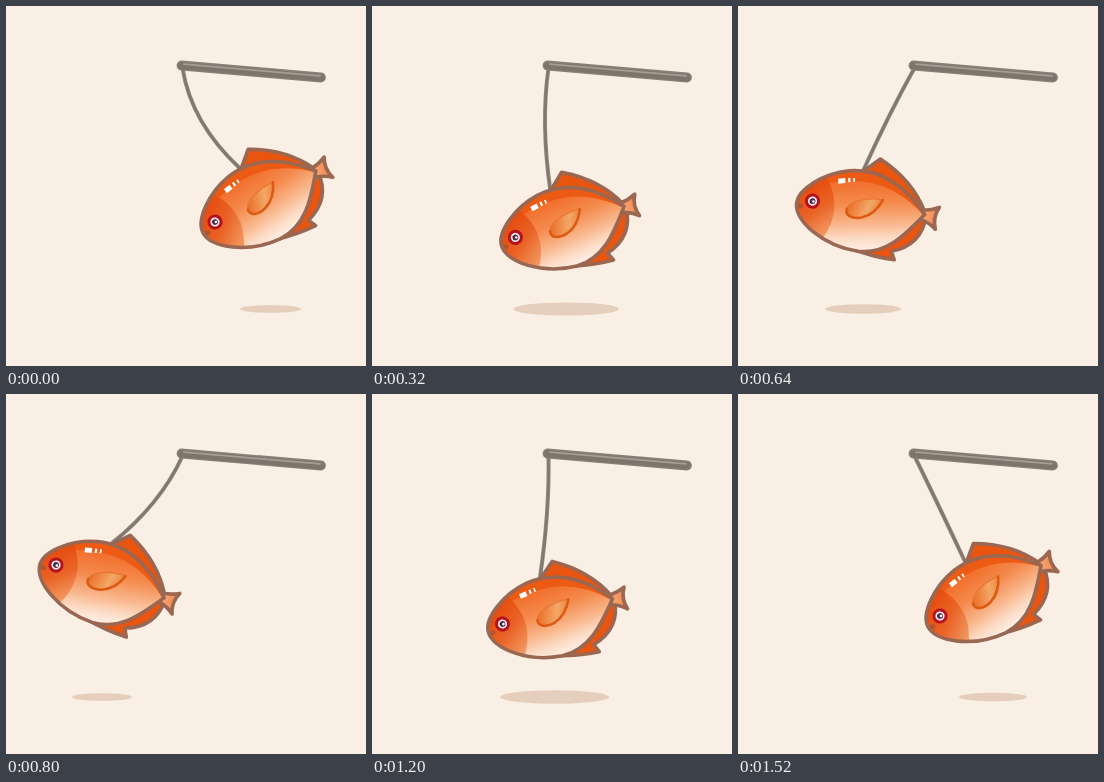
Write an HTML page that moves like this. It is 360 by 360 pixels and loops after 1560 ms.

```html
<!DOCTYPE html>
<html lang="en">
<head>
<meta charset="utf-8">
<title>Swinging fish</title>
<style>
  html, body { margin: 0; width: 100%; height: 100%; overflow: hidden; background: #f9efe4; }
  svg { display: block; width: 100vw; height: 100vh; }
</style>
</head>
<body>
<svg viewBox="0 0 360 360">
  <defs>
    <linearGradient id="belly" gradientUnits="userSpaceOnUse" x1="140" y1="184" x2="151" y2="253">
      <stop offset="0" stop-color="#f16c28"/>
      <stop offset=".35" stop-color="#f4894c"/>
      <stop offset=".65" stop-color="#f9b78c"/>
      <stop offset=".85" stop-color="#fcdac3"/>
      <stop offset="1" stop-color="#feece0"/>
    </linearGradient>
    <linearGradient id="head" gradientUnits="userSpaceOnUse" x1="84" y1="204" x2="115" y2="240">
      <stop offset="0" stop-color="#e64c0e"/>
      <stop offset=".5" stop-color="#ea6427"/>
      <stop offset="1" stop-color="#f19860"/>
    </linearGradient>
    <linearGradient id="fin" gradientUnits="userSpaceOnUse" x1="130" y1="208" x2="158" y2="216">
      <stop offset="0" stop-color="#ea6a22"/>
      <stop offset=".7" stop-color="#f2a868"/>
      <stop offset="1" stop-color="#ee8a45"/>
    </linearGradient>
    <linearGradient id="tail" gradientUnits="userSpaceOnUse" x1="203" y1="0" x2="220" y2="0">
      <stop offset="0" stop-color="#f9b080"/>
      <stop offset="1" stop-color="#f2844a"/>
    </linearGradient>
    <path id="body" d="M78.500 217C78.500 203 101 184 126 178C158 171 186 187 207 211C193 230 176 256 146 256.500C111 256 78.500 235 78.500 217Z"/>
    <clipPath id="inside"><use href="#body"/></clipPath>
  </defs>

  <ellipse id="shadow" cy="303" fill="#e6cebc"/>

  <g fill="none" stroke-linecap="round">
    <path class="string" stroke="#928880" stroke-width="4"/>
    <path class="string" stroke="#81776d" stroke-width="2.2"/>
    <path d="M175.500 59.500L315 71.500" stroke="#8a7f76" stroke-width="9.800"/>
    <path d="M175.500 59.800L315 71.800" stroke="#7f746b" stroke-width="7"/>
    <path d="M178 58.200L314 69.900" stroke="#a79d94" stroke-width="1.800"/>
  </g>

  <g id="fish" stroke="#996752" stroke-width="3.6" stroke-linejoin="round" stroke-linecap="round">
    <path d="M139 178L155.500 162Q191 179 207 209Z" fill="#e9540f"/>
    <path d="M140 255Q162 260 183 260L179 252Q208 242 208.500 213Z" fill="#e9540f"/>
    <path d="M204 207Q213 206 220.500 202Q215 213 219.500 224Q212 218 204 216.500Z" fill="url(#tail)"/>
    <g clip-path="url(#inside)" stroke="none">
      <use href="#body" fill="url(#belly)"/>
      <path d="M76 210Q100 190 137 187Q174 184 207 213V165H76Z" fill="#ec5a13"/>
      <path d="M104 186Q128 218 107 252H70V186Z" fill="url(#head)"/>
      <ellipse cx="82" cy="219.500" rx="3.500" ry="2.500" fill="#b4522a"/>
    </g>
    <use href="#body" fill="none"/>
    <path d="M164 202C161 212 154 220 145 223C136 226 128 223 129 216C131 207 148 202 164 202Z" fill="url(#fin)" stroke="none"/>
    <path d="M164 202C148 202 131 207 129 216" fill="none" stroke="#e8752f" stroke-width="1.2"/>
    <path d="M163.500 202.500C160 212 153 219.500 145 222.500C136 225.500 128 223 129 216" fill="none" stroke="#dd5a12" stroke-width="2.600"/>
    <g fill="#fff" stroke="none">
      <path d="M116.300 187.300L123.300 185.700L124.200 190.700L117.300 192.200Z"/>
      <path d="M126.200 185.300L128.400 185L129 189L126.900 189.400Z"/>
      <path d="M131.200 184.500L133 184.300L133.500 188L131.800 188.300Z"/>
    </g>
    <g stroke="none">
      <circle cx="94" cy="213" r="7.600" fill="#b5121f"/>
      <circle cx="94" cy="213" r="4.600" fill="#fbeef0"/>
      <circle cx="94" cy="213" r="2.900" fill="#4b2740"/>
      <circle cx="94.900" cy="213.300" r="1.300" fill="#fff"/>
    </g>
  </g>
</svg>
<script>
  const LOOP = 1560, HALF = LOOP / 2, STEP = 40, TURN = 8;
  const PIVOT = [176.5, 62], EYE = [94, 213], HOOK = [46, -37];

  // Poses along the swing, from the right end to the left end.
  const at = [8, 48, 152, 368, 432, 528, 768];
  const pose = {
    x: [209, 202, 180, 130.5, 116, 94, 50],
    y: [216, 222, 233, 230, 227, 213, 171],
    turn: [-25.8, -25.6, -23.1, -11.9, -8.2, 0, 17.9],
    shade: [264.5, 255, 227.5, 182.5, 167.5, 147.5, 96],
    width: [30.5, 34, 43.5, 54.5, 50.5, 44.5, 30]
  };
  // Slack of the string: it snaps over at each end, then tightens.
  const slackLeft = [[0, 160, 440, 780], [10, 6.5, 3, 0]];
  const slackRight = [[780, 1040, 1200, 1560], [-7, -3, -2.5, 0]];

  function spline(xs, ys, x) {
    const last = xs.length - 1;
    let i = 0;
    while (i < last - 1 && x > xs[i + 1]) i++;
    const slope = k => {
      const a = Math.max(k - 1, 0), b = Math.min(k + 1, last);
      return (ys[b] - ys[a]) / (xs[b] - xs[a]);
    };
    const h = xs[i + 1] - xs[i], s = (x - xs[i]) / h, r = 1 - s;
    return ys[i] * r * r * (1 + 2 * s) + ys[i + 1] * s * s * (3 - 2 * s)
      + h * s * r * (slope(i) * r - slope(i + 1) * s);
  }

  const fish = document.getElementById('fish');
  const shadow = document.getElementById('shadow');
  const strings = document.querySelectorAll('.string');

  function draw(t) {
    const d = (t - TURN + LOOP) % LOOP;
    const u = d < HALF ? d : LOOP - d;
    const get = key => spline(at, pose[key], u);
    const x = get('x'), y = get('y'), turn = get('turn'), width = get('width');

    fish.setAttribute('transform',
      `translate(${x} ${y}) rotate(${turn}) translate(${-EYE[0]} ${-EYE[1]})`);
    shadow.setAttribute('cx', get('shade'));
    shadow.setAttribute('rx', width);
    shadow.setAttribute('ry', width * 0.125);

    const a = turn * Math.PI / 180, c = Math.cos(a), s = Math.sin(a);
    const hx = x + HOOK[0] * c - HOOK[1] * s;
    const hy = y + HOOK[0] * s + HOOK[1] * c;
    const dx = hx - PIVOT[0], dy = hy - PIVOT[1];
    const k = 2 * spline(...(t < HALF ? slackLeft : slackRight), t) / Math.hypot(dx, dy);
    const mx = PIVOT[0] + dx * 0.45 - dy * k;
    const my = PIVOT[1] + dy * 0.45 + dx * k;
    const path = `M${PIVOT}Q${mx} ${my} ${hx} ${hy}`;
    strings.forEach(p => p.setAttribute('d', path));
  }

  const start = performance.now();
  function tick() {
    const t = (performance.now() - start) % LOOP;
    draw(Math.floor(t / STEP) * STEP);
    requestAnimationFrame(tick);
  }
  tick();
</script>
</body>
</html>
```
